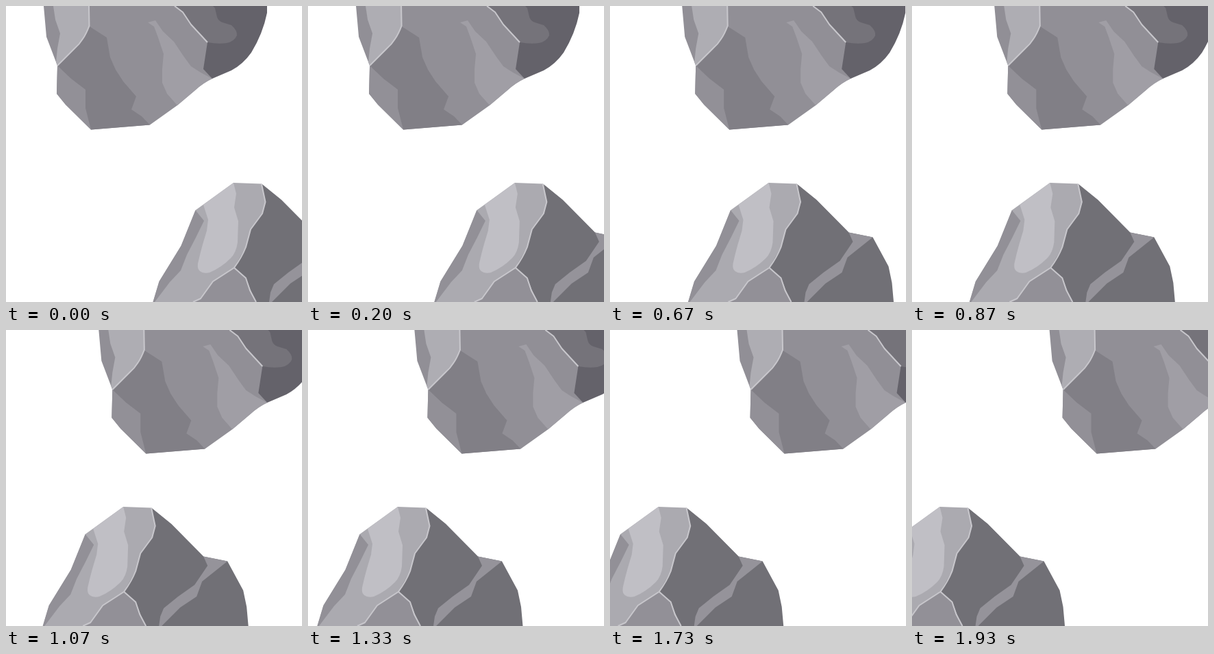
Animation, 432 px wide and 432 px high, one loop 1960 ms. Source, as an HTML page:

```html
<!DOCTYPE html>
<html lang="en">
<head>
<meta charset="utf-8">
<title>Drifting rocks</title>
<style>
  html, body { margin: 0; width: 100%; height: 100%; overflow: hidden; background: #fff; }
  svg { display: block; width: 100vw; height: 100vh; }
  .edge { fill: none; stroke: #c8c7cc; stroke-width: 2; stroke-linejoin: round; }
</style>
</head>
<body>
<svg viewBox="0 0 432 432">
  <g id="upper">
    <path fill="#918f96" d="M55 0L59 45L75 87L74 128L87 144L124 180.500L210 173.500L250 145L276 123Q288 112 301 106L320 40L260 0Z"/>
    <path fill="#aeadb3" d="M69 0L72 20L79 40L75 62L73 82L75 87L100 62L112 48L122 30L121 0Z"/>
    <path fill="#817f86" d="M122 30L147 46L152 75L160 93L171 110L190 132L183 151L198 161L210 173.500L124 180.500L100 120L75 87L100 62L112 48Z"/>
    <path fill="#929097" d="M75 87L95 106L116 122L116 149L124 180.500L87 144L74 128Z"/>
    <path fill="#a09ea5" d="M207 24L218 21L229 37L245 52L259 73L270 88L284 97L301 106Q288 112 276 123L250 145L235 128L228 112L228 92L230 70L222 46L216 30Z"/>
    <path fill="#64626a" d="M247 0L258 9L270 27L294 53L288 92L301 106L329 94Q346 85 358 68Q375 40 381 10L381 0Z"/>
    <path fill="#75737a" d="M247 0L302 0L305 3L308 16Q310 22 316 24L329 28Q338 36 337 43Q333 52 322 54Q310 56 294 53L270 27L258 9Z"/>
    <path class="edge" d="M121 0L121.500 29Q117 41 112 48Q107 56 100 62L75 87"/>
    <path class="edge" d="M246 0L258 9L270 27L294 53"/>
  </g>
  <g id="lower">
    <path fill="#abaab0" d="M332 258L373 259.500L402 283L449 330.500L400 432L214.500 432L223.500 402L255.500 350L276.500 298L296 284Z"/>
    <path fill="#929097" d="M276.500 298L289 313.500L277 338L264 363L255 386L239 403L217 432L214.500 432L223.500 402L255.500 350Z"/>
    <path fill="#c0bfc5" d="M288 290L332 258L336 274L333 294L339 314L338 345Q336 360 328 368Q314 382 297 389Q288 391 283 387Q279 384 280 376Q283 362 287 348L293 328L295 312Z"/>
    <path fill="#717076" d="M373 259.500L402 283L449 330.500L484 337.500L507 380L512 404L514.500 432L364 432L350 397L333 382L350 352L357 326L374 303L379 286Z"/>
    <path fill="#95939a" d="M449 330.500L484 337.500L447 367L439 389L415 405L394 426L388 432L384 432L386 418L391 406L412 389L436 372L455 344Z"/>
    <path fill="#929097" d="M333 382L350 397L356 415L365 432L273 432L284 427L302 402Z"/>
    <path class="edge" d="M373 260L378.500 286L374 303L357 326L350 352Q344 367 333 382L302 402L284 427L273 432"/>
    <path class="edge" d="M333 382L350 397L356 415L365 432"/>
  </g>
</svg>
<script>
  const LOOP = 1960;
  const upper = document.getElementById('upper');
  const lower = document.getElementById('lower');

  const slide = (rock, x) => rock.setAttribute('transform', `translate(${x} 0)`);

  // 30 steps per second, each starting on a whole hundredth of a second
  function draw() {
    const tick = Math.floor((performance.now() % LOOP) / 10);
    const step = Math.floor((tick * 3 + 1) / 10);
    slide(upper, step * 2.51);
    slide(lower, step * -5.025);
    requestAnimationFrame(draw);
  }
  draw();
</script>
</body>
</html>
```
